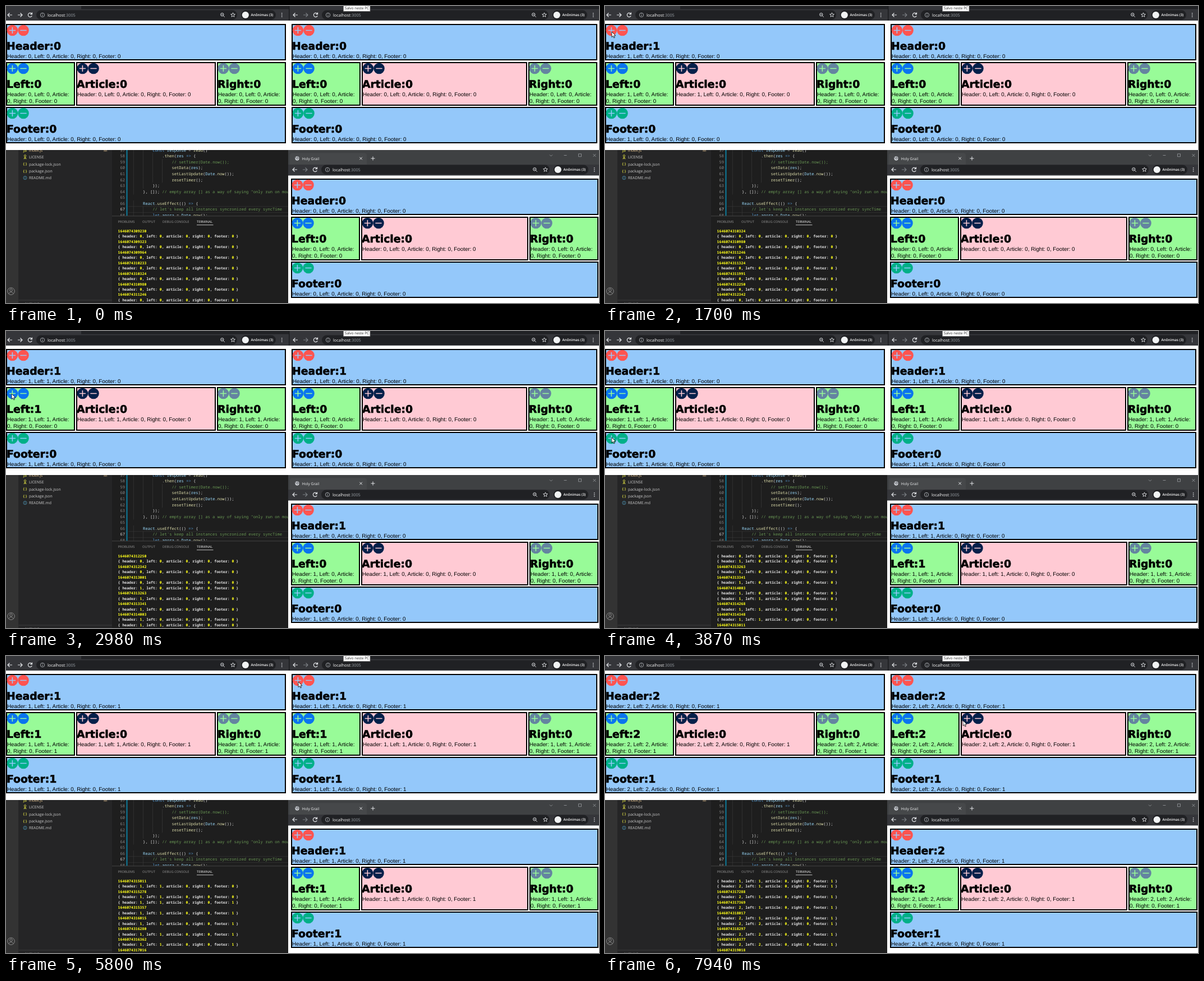
Write an HTML page that moves like this. It is 1057 by 530 pixels and loops after 8 s.

```html
<!DOCTYPE html>
<html lang="pt">
<head>
<meta charset="utf-8">
<title>Holy Grail</title>
<style>
html, body { margin: 0; width: 100%; height: 100%; overflow: hidden; background: #fff; }
svg { display: block; width: 1057px; height: 530px; }
text { white-space: pre; text-rendering: geometricPrecision; }
.ui { font-family: "Open Sans", "Noto Sans", sans-serif; }
.code { font: 7.13px "Noto Sans Mono", "DejaVu Sans Mono", monospace; }
.log { font: 600 6.5px "Noto Sans Mono", "DejaVu Sans Mono", monospace; }
.title { font: 700 18.8px "DejaVu Sans", Verdana, sans-serif; stroke: #000; stroke-width: .6px; }
.sub { font: 9.8px "Liberation Sans", Arial, sans-serif; }
</style>
</head>
<body>
<svg id="stage" viewBox="0 0 1057 530"></svg>
<script>
const stage = document.getElementById('stage');
const LOOP = 8000;

function el(tag, attrs, parent = stage) {
  const node = document.createElementNS('http://www.w3.org/2000/svg', tag);
  for (const key in attrs) node.setAttribute(key, attrs[key]);
  parent.appendChild(node);
  return node;
}
const rect = (x, y, width, height, fill, more) => el('rect', { x, y, width, height, fill, ...more });
const circle = (cx, cy, r, fill, more) => el('circle', { cx, cy, r, fill, ...more });
const line = (d, stroke, width = 1.2, more) => el('path', { d, stroke, fill: 'none', 'stroke-width': width, ...more });
function text(str, x, y, cls, fill, more) {
  const node = el('text', { x, y, class: cls, fill, ...more });
  node.textContent = str;
  return node;
}
const ui = (str, x, y, size, fill, more) => text(str, x, y, 'ui', fill, { 'font-size': size, ...more });

// ---- Shared data -------------------------------------------------------
const NAMES = ['Header', 'Left', 'Article', 'Right', 'Footer'];
const CLICKS = [0, 1, 4, 0, 1];
const SAVED = [1960, 2960, 4040, 5970, 6970];

function counts(times, t) {
  const n = [0, 0, 0, 0, 0];
  times.forEach((at, i) => { if (t >= at) n[CLICKS[i]]++; });
  return n;
}

// ---- Holy grail pages --------------------------------------------------
const BLUE = '#94c8fa', GREEN = '#98fb98', PINK = '#ffcad4';
const FILLS = [BLUE, GREEN, PINK, GREEN, BLUE];
const BUTTONS = ['#ff5450', '#0a74ef', '#04204a', '#6484a0', '#00b088'];

function button(cx, cy, color, bg, plus) {
  circle(cx, cy, 9.8, color);
  line(`M${cx - 5} ${cy}h10` + (plus ? `M${cx} ${cy - 5}v10` : ''), bg, 1.6, { 'stroke-linecap': 'round' });
}

function makePage(x, y, w, times) {
  const boxes = [
    [0, 0, w, 65], [0, 68, 123, 78], [125, 68, w - 250, 78],
    [w - 123, 68, 123, 78], [0, 148, w, 65]
  ];
  const parts = boxes.map(([dx, dy, bw, bh], i) => {
    const left = x + dx, top = y + dy;
    rect(left + 1, top + 1, bw - 2, bh - 2, FILLS[i], { stroke: '#000', 'stroke-width': 2 });
    button(left + 11.4, top + 11.5, BUTTONS[i], FILLS[i], true);
    button(left + 31, top + 11.5, BUTTONS[i], FILLS[i], false);
    const narrow = bw === 123;
    return {
      narrow,
      title: text('', left + 1, top + 45.8, 'title', '#000'),
      sub: text('', left + 2, top + 60.8, 'sub', '#000'),
      rest: narrow ? text('', left + 2, top + 72.8, 'sub', '#000') : null
    };
  });
  return t => {
    const n = counts(times, t);
    const all = NAMES.map((name, i) => `${name}: ${n[i]}`).join(', ');
    const cut = all.indexOf('Article:') + 8;
    parts.forEach((p, i) => {
      p.title.textContent = `${NAMES[i]}:${n[i]}`;
      p.sub.textContent = p.narrow ? all.slice(0, cut) : all;
      if (p.narrow) p.rest.textContent = all.slice(cut + 1);
    });
  };
}

// ---- Browser toolbars --------------------------------------------------
function arrowIcon(x, y, dir, color) {
  line(`M${x - 4 * dir} ${y}h${8 * dir}m${-3.5 * dir} -3.5l${3.5 * dir} 3.5l${-3.5 * dir} 3.5`, color, 1.2);
}

function toolbar(x, y, right, forward) {
  const light = '#e4e6e9';
  rect(x + 54, y - 8.5, right - x - 28, 17, '#202124', { rx: 8.5 });
  rect(right + 33, y - 8.5, 62, 17, '#202124', { rx: 8.5 });
  arrowIcon(x + 7, y, -1, light);
  arrowIcon(x + 25, y, 1, forward);
  line(`M${x + 46} ${y - 2}a3.6 3.6 0 1 0 .3 3.4M${x + 46.5} ${y - 4.5}v3.2h-3.2`, light);
  circle(x + 65, y, 3.7, 'none', { stroke: '#bdc1c6', 'stroke-width': .8 });
  line(`M${x + 65} ${y - .5}v2.5m0 -4.7v1`, '#bdc1c6', .9);
  const url = ui('localhost', x + 74, y + 2.7, 7.4, '#fff');
  el('tspan', { fill: '#9aa0a6' }, url).textContent = ':3005';
  circle(right - .7, y - .7, 2.7, 'none', { stroke: light, 'stroke-width': 1 });
  line(`M${right + 1.3} ${y + 1.3}l2.6 2.6M${right - 2} ${y - .7}h2.6`, light, .9);
  let star = '';
  for (let i = 0; i < 10; i++) {
    const r = i % 2 ? 1.8 : 4.1, a = i * Math.PI / 5;
    star += `${i ? 'L' : 'M'}${right + 18.5 + r * Math.sin(a)} ${y - r * Math.cos(a)}`;
  }
  line(star + 'Z', light, .9);
  circle(right + 40.8, y, 6.1, '#f1f3f4');
  ui('Anônimas (3)', right + 50.5, y + 2.3, 6.3, '#fff', { 'font-weight': 600 });
  for (const d of [-3, 0, 3]) circle(right + 105.7, y + d, .85, light);
}

rect(0, 0, 1057, 530, '#fff');
rect(0, 0, 1057, 26, '#35363a');
rect(134, 0, 370, 5.5, '#202124');
rect(640, 0, 417, 5.5, '#202124');
rect(504, 0, 1.5, 26, '#1b1c1e');
toolbar(0, 16, 386, '#e4e6e9');
toolbar(509, 16, 941, '#7c8085');
rect(601.5, -2, 47.5, 11.5, '#fff', { stroke: '#777', 'stroke-width': .8 });
ui('Salvo neste PC', 604, 6, 6.35, '#222');

rect(503, 257, 554, 27, '#3f4143');
rect(506, 262.5, 137, 24, '#46484a', { rx: 4 });
rect(503, 283, 554, 19.5, '#35363a');
circle(519, 272, 3.7, '#c8cbd0');
line('M516 270.5l2.5 1l1 2.5M520 268.8l-.5 2l3 1', '#55585d', 1);
ui('Holy Grail', 527.8, 274.7, 6.7, '#f1f3f4');
line('M630.3 269.7l4.6 4.6m0 -4.6l-4.6 4.6M650.5 272h7m-3.5 -3.5v7', '#e4e6e9', 1);
line('M969 265.5l2.5 2.5l2.5 -2.5M994.5 266.5h5M1020.5 263.8h5v5h-5zM1046.5 264l5 5m0 -5l-5 5', '#9b9da1', .8);
toolbar(508, 292, 943, '#7c8085');

const pages = [
  makePage(0, 32, 499, [1700, 2850, 4030, 6070, 7040]),
  makePage(509, 32, 545, [2710, 3740, 4760, 5830, 6950]),
  makePage(508, 308, 548, [2080, 3090, 4110, 6140, 7120])
];

// ---- Code editor -------------------------------------------------------
const clip = el('clipPath', { id: 'editor' });
el('rect', { x: 0, y: 257, width: 503, height: 117.5 }, clip);
rect(0, 257, 503, 273, '#1e1e1e');
rect(0, 257, 22.5, 273, '#333333');
rect(22.5, 257, 166.5, 273, '#252526');
circle(9, 509, 6.3, 'none', { stroke: '#8a8a8a', 'stroke-width': 1 });
circle(9, 507, 2.3, 'none', { stroke: '#8a8a8a', 'stroke-width': 1 });
line('M5 513.7c1 -4.5 7 -4.5 8 0', '#8a8a8a', 1);
line('M22.5 525h166.5', '#454545', .8);
line('M27 530l2 2', '#ccc', .8);
ui('OUTLINE', 33, 533.5, 6, '#ccc', { 'font-weight': 700 });

const inEditor = { 'clip-path': 'url(#editor)' };
const file = (name, y, icon, color, fill = '#ccc') => {
  ui(icon, 34, y + 2.4, 6.6, color, { 'text-anchor': 'middle', 'font-weight': 700, ...inEditor });
  ui(name, 41, y + 2.5, 6.9, fill, inEditor);
};
file('index.js', 257.2, 'JS', '#cbcb41', '#e2c08d');
ui('M', 174, 259.7, 6.9, '#e2c08d', inEditor);
file('LICENSE', 269.8, '', '#cbcb41');
circle(34, 267.4, 1.7, 'none', { stroke: '#cbcb41' });
line('M34 269v4M32 273.3l1.3 -3.4M36 273.3l-1.3 -3.4', '#cbcb41', 1);
file('package-lock.json', 282, '{ }', '#cbcb41');
file('package.json', 294.3, '{ }', '#cbcb41');
file('README.md', 306.7, '', '#519aba');
circle(34, 306.7, 3, 'none', { stroke: '#519aba', 'stroke-width': .8 });
line('M34 306.2v2m0 -3.7v.9', '#519aba', .9);

const INK = { k: '#569cd6', v: '#9cdcfe', f: '#dcdcaa', c: '#6a9955', p: '#d4d4d4' };
// Each piece starts with its ink letter.
const CODE = [
  [2, 'kconst |vresponse|p = |fread|p()'],
  [3, 'p.|fthen|p(|vres |k=>|p {'],
  [4, 'c// setTimer(Date.now());'],
  [4, 'fsetData|p(|vres|p);'],
  [4, 'fsetLastUpdate|p(|vDate|p.|fnow|p());'],
  [4, 'fresetTimer|p();'],
  [2, 'p});'],
  [1, 'p}, []); |c// empty array [] as a way of saying "only run on mount"'],
  [0, 'p'],
  [1, 'vReact|p.|fuseEffect|p(() |k=>|p {'],
  [2, "c// let's keep all instances syncronized every syncTime"],
  [2, 'klet |vagora|p = |vDate|p.|fnow|p();']
];
line('M218 357.8h285M218 368.4h285', '#303030', .9);
CODE.forEach(([depth, src], i) => {
  const y = 257.2 + 10.56 * i, current = i === 10;
  text(57 + i, 212, y + 2.6, 'code', current ? '#d0d0d0' : '#858585', { 'text-anchor': 'end', ...inEditor });
  for (let d = 0; d < depth; d++)
    line(`M${227.3 + 17.12 * d} ${y - 5.3}v10.6`, '#404040', .6, inEditor);
  const row = text('', 227 + 17.12 * depth, y + 2.6, 'code', INK.p, inEditor);
  src.split('|').forEach(s => { el('tspan', { fill: INK[s[0]] }, row).textContent = s.slice(1); });
});
rect(214.5, 257, 2, 117.5, '#0c7d9d');

line('M189 374.8h314', '#4a4a4a', .9);
[['PROBLEMS', 199.5], ['OUTPUT', 243], ['DEBUG CONSOLE', 279], ['TERMINAL', 340]].forEach(([tab, x], i) =>
  ui(tab, x, 387.2, 5.8, i === 3 ? '#f0f0f0' : '#979797'));
line('M340 390.7h29.5', '#e7e7e7', .8);

// ---- Terminal log ------------------------------------------------------
const EPOCH = 1646074309000, START = 2265;
const STAMPS = [
  230, 323, 964, 1233, 1324, 1980, 2246, 2324, 2991, 3250, 3342, 4001, 4263, 4341, 5003,
  5268, 5348, 6011, 6278, 6357, 7015, 7280, 7362, 8016, 8288, 8369, 9017, 9297, 9377, 10018
];
const READ_DELAY = [10, 500, 200];
const events = [];
STAMPS.forEach((stamp, i) => {
  const at = stamp - START;
  events.push({ at, stamp: EPOCH + stamp }, { at: at + READ_DELAY[i % 3] });
});
SAVED.forEach(at => events.push({ at }));
events.sort((a, b) => a.at - b.at);

const ROWS = 14, YELLOW = '#ffff1a';
const rows = Array.from({ length: ROWS }, (_, i) => text('', 199.6, 403.8 + 9.47 * i, 'log', '#e4e4e4'));
let shown = -1;

function drawLog(t) {
  const n = events.filter(e => e.at <= t).length;
  if (n === shown) return;
  shown = n;
  rows.forEach((row, i) => {
    const e = events[n - ROWS + i];
    row.textContent = '';
    const add = (str, fill) => { el('tspan', fill ? { fill } : {}, row).textContent = str; };
    if (e.stamp) return add(e.stamp, YELLOW);
    counts(SAVED, e.at).forEach((v, j) => {
      add(`${j ? ', ' : '{ '}${NAMES[j].toLowerCase()}: `);
      add(v, YELLOW);
    });
    add(' }');
  });
}

// ---- Pointer -----------------------------------------------------------
const arrow = el('path', {
  d: 'M0 0V9.6L2.3 7.5L3.9 11L5.4 10.3L3.9 6.9H7Z', fill: '#fff', stroke: '#000', 'stroke-width': .8
});
const beam = line('M-2 -4.5h4M0 -4.5v9M-2 4.5h4', '#222', .8);
// time, x, y, text beam until the next key
const PATH = [
  [70, 1010, 540, 0], [870, 62, 88, 1], [940, 45, 80, 1], [1150, 26, 60, 0], [1350, 12, 46, 0],
  [1960, 12, 46, 0], [2300, 8, 85, 1], [2430, 8, 92, 1], [2500, 9, 98, 0], [2710, 10, 112, 0],
  [3100, 10, 112, 0], [3600, 12, 190, 0], [4350, 12, 190, 0], [4600, 100, 152, 1],
  [4770, 177, 126, 1], [5180, 404, 76, 1], [5350, 480, 58, 0], [5500, 521, 46, 0],
  [6070, 521, 46, 0], [6500, 521, 113, 0], [7200, 521, 113, 0], [7740, 642, 106, 0], [7940, 638, 115, 0]
];

function drawPointer(t) {
  const i = PATH.findLastIndex(k => k[0] <= t);
  const a = PATH[Math.max(i, 0)], b = PATH[Math.min(i + 1, PATH.length - 1)];
  const u = b[0] > a[0] ? (t - a[0]) / (b[0] - a[0]) : 0;
  const mix = j => a[j] + (b[j] - a[j]) * u;
  const place = `translate(${mix(1)} ${mix(2)})`;
  arrow.setAttribute('transform', place);
  beam.setAttribute('transform', place);
  arrow.setAttribute('visibility', a[3] ? 'hidden' : 'visible');
  beam.setAttribute('visibility', a[3] ? 'visible' : 'hidden');
}

function draw() {
  const t = performance.now() % LOOP;
  pages.forEach(page => page(t));
  drawLog(t);
  drawPointer(t);
  requestAnimationFrame(draw);
}
draw();
</script>
</body>
</html>
```
